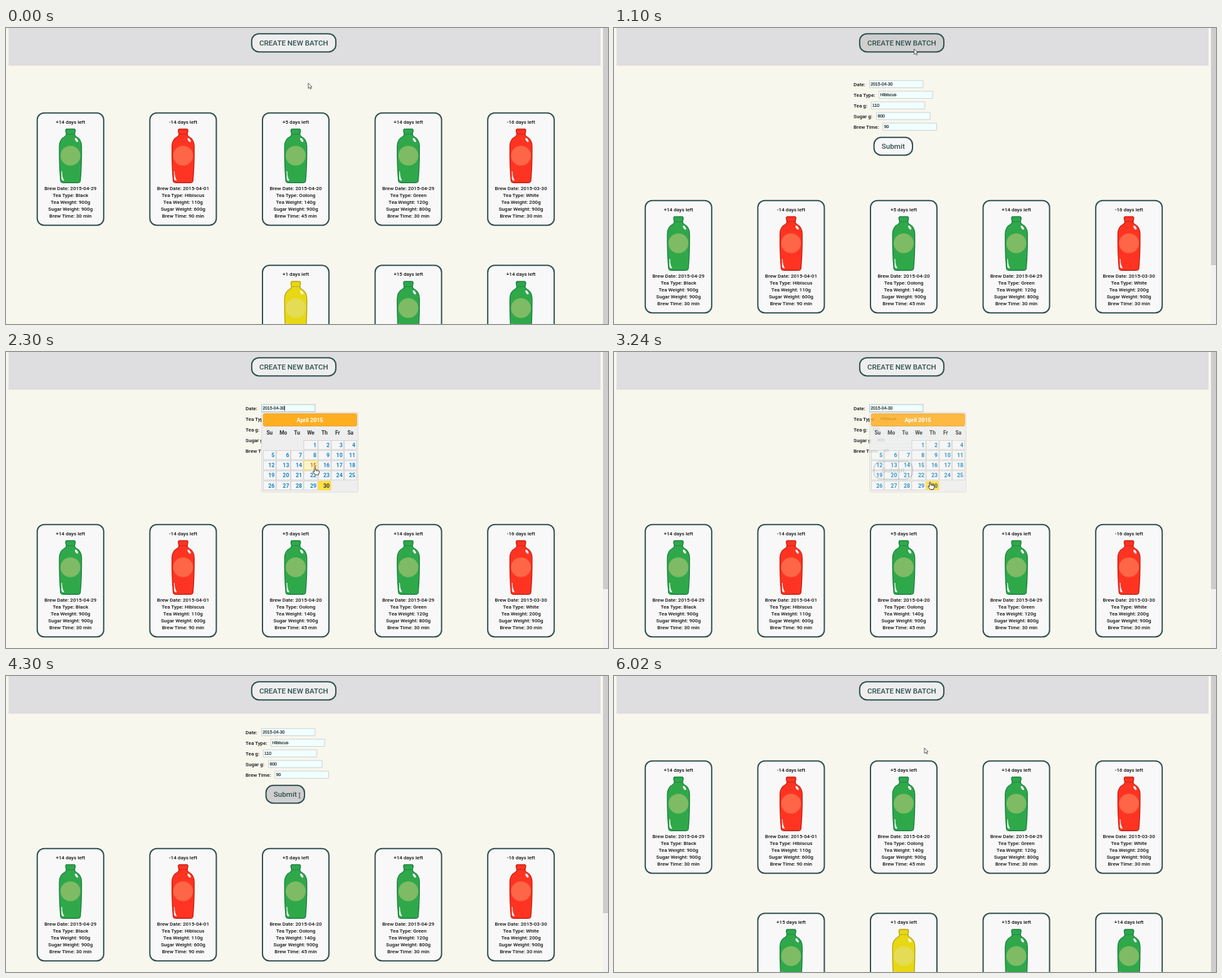
Write an HTML page that moves like this. It is 960 px wide and 473 px high and loops after 6.18 s.

```html
<!DOCTYPE html>
<html lang="en">
<head>
<meta charset="utf-8">
<title>Tea batches</title>
<style>
html, body { margin: 0; width: 100%; height: 100%; overflow: hidden; background: #f8f7ee; }
svg { display: block; width: 100vw; height: 100vh; }
text { font: 500 8.1px Roboto, sans-serif; fill: #111; }
.mid { text-anchor: middle; }
.btn text { font-size: 11.6px; fill: #2f4f4f; text-anchor: middle; }
.btn rect, .card { stroke: #2f4f4f; stroke-width: 2; }
.card { fill: #f8f8f8; }
.input { fill: #f0ffff; stroke: #c6c6c6; stroke-width: .8; }
.value { font: 6.9px "Liberation Sans", Arial, sans-serif; stroke: #111; stroke-width: .15; }
.head { font-size: 9.1px; font-weight: 700; fill: #fff; }
.week { font-size: 8.4px; font-weight: 700; fill: #333; }
.day rect { fill: #f6f6f6; stroke: #ccc; stroke-width: .8; }
.day text { font-size: 8.9px; font-weight: 700; fill: #1c86c4; text-anchor: end; }
.day.over rect { fill: #fdf5ce; stroke: #fbcb09; }
.day.over text { fill: #c77405; }
.day.today rect { fill: #ffe045; stroke: #fed22f; }
.day.today text { fill: #363636; }
</style>
</head>
<body>
<svg id="stage" viewBox="0 0 960 473" preserveAspectRatio="none"></svg>
<script>
const LOOP = 6180, OPEN = 820, CLOSE = 4340, SHIFT = 140;
const stage = document.getElementById('stage');
const $ = id => document.getElementById(id);

const label = (x, y, s, cls = '') => `<text x="${x}" y="${y}" class="${cls}">${s}</text>`;
const box = (x, y, w, h, r, attrs) =>
  `<rect x="${x}" y="${y}" width="${w}" height="${h}" rx="${r}" ${attrs}/>`;

// body, edge, badge
const tints = {
  green: ['#2fa84a', '#1b8044', '#7fbb64'],
  red: ['#ff3322', '#c71f12', '#ff6647'],
  yellow: ['#e8d813', '#b5a311', '#e5dc56']
};

function bottle(tint) {
  const [body, edge, badge] = tints[tint];
  return `<path d="M-6 26.5H6Q8 27 7.6 30L6.6 34.5Q6.5 37 9 38.5Q17.7 43 17.7 54
      Q18 84 15.8 109Q15.4 112.3 11 112.3H-11Q-15.4 112.3 -15.8 109
      Q-18 84 -17.7 54Q-17.7 43 -9 38.5Q-6.5 37 -6.6 34.5L-7.6 30Q-8 27 -6 26.5Z"
      fill="${body}" stroke="${edge}" stroke-width="1.4"/>
    <path d="M-6.5 34.6H6.5" stroke="${edge}" stroke-width=".9"/>
    <circle cy="69" r="15.8" fill="${badge}"/>
    <ellipse cx="9.6" cy="44" rx="1.7" ry="3.6" transform="rotate(-35 9.6 44)" fill="#fff"/>
    <path d="M-14 94Q-13.6 104 -10.5 108.5Q-13.8 109 -14 106Z" fill="#fff" stroke="#fff" stroke-width=".7"/>`;
}

function card(col, row, days, tint, info) {
  const names = ['Brew Date: ', 'Tea Type: ', 'Tea Weight: ', 'Sugar Weight: ', 'Brew Time: '];
  const lines = info ? info.split(',').map((v, i) =>
    label(0, 124.4 + i * 11, names[i] + v, 'mid')).join('') : '';
  return `<g transform="translate(${102.8 + col * 179.6} ${135 + row * 243.5})">
    ${box(-53, .7, 106, 179.6, 11, 'class="card"')}
    ${label(0, 17.6, days + ' days left', 'mid')}${bottle(tint)}${lines}</g>`;
}

const button = (id, x, y, w, h, s) =>
  `<g class="btn">${box(x, y, w, h, 11.5, `id="${id}"`)}${label(x + w / 2, y + 18.6, s)}</g>`;

const fields = [
  ['Date:', 407.4, '2015-04-30'], ['Tea Type:', 422.6, 'Hibiscus'],
  ['Tea g:', 410.3, '110'], ['Sugar g:', 418.6, '600'], ['Brew Time:', 428.9, '90']
];
const form = fields.map(([name, x, v], i) => {
  const y = 84 + i * 17;
  return label(382, y + 8.5, name) + box(x, y, 85.5, 11.5, 0, `class="input" id="input${i}"`) +
    label(x + 1.8, y + 8.3, v, 'value');
}).join('');

const colX = [410.5, 431.2, 454.3, 475, 498, 519, 539.6, 560];
const days = Array.from({ length: 30 }, (_, i) => {
  const col = (i + 3) % 7, row = Math.floor((i + 3) / 7);
  return { n: i + 1, x: colX[col], y: 141.4 + row * 16.2, w: colX[col + 1] - colX[col] - 1, h: 14.4 };
});
const calendar = box(407.5, 96.5, 154, 127.5, 2, 'fill="#eee" stroke="#ddd"') +
  box(410.3, 98.6, 149, 19.8, 2, 'fill="#ffae22" stroke="#eb9a14" stroke-width=".8"') +
  label(484.7, 111.8, 'April 2015', 'mid head') +
  ['Su', 'Mo', 'Tu', 'We', 'Th', 'Fr', 'Sa'].map((s, i) =>
    label((colX[i] + colX[i + 1]) / 2 - .5, 132.2, s, 'mid week')).join('') +
  days.map(d => `<g id="day${d.n}" class="day">${box(d.x, d.y, d.w, d.h, 0, '')}
    ${label(d.x + d.w - 1.8, d.y + 10.4, d.n)}</g>`).join('');

const pointers = {
  arrow: '<path d="M0 0V8.6L2 6.8L3.4 9.7L4.8 9L3.5 6.2H6Z" fill="#fff" stroke="#333" stroke-width=".8"/>',
  beam: '<path d="M-1.6 -4H-.5L0 -3.5L.5 -4H1.6M0 -3.5V3.5M-1.6 4H-.5L0 3.5L.5 4H1.6" fill="none" stroke="#333" stroke-width=".9"/>',
  hand: `<path d="M-1 .8Q0 -.8 1 .8V4.6L2.2 4.2L3.3 4.7L4.4 4.6L5.5 5.3Q6.6 5.2 6.6 6.5V8.8L5.4 12H.4
    L-3 7.8Q-3.4 6.4 -2.2 6.5L-1 7.6Z" fill="#fff" stroke="#222" stroke-width=".9"/>
    <path d="M2.2 4.4V6.6M4.3 4.8V6.8" stroke="#222" stroke-width=".6"/>`
};

stage.innerHTML = `
  <rect width="960" height="473" fill="#f8f7ee"/>
  <rect x="4" width="945" height="61" fill="#fceee5"/>
  <rect x="4" width="944" height="60" fill="#dedddf"/>
  ${button('create', 391.8, 9.2, 134.2, 29, 'CREATE NEW BATCH')}
  <rect x="952" width="8" height="473" fill="#f1f1f1"/>
  <rect id="thumb" x="952" width="8" fill="#cdcdcd"/>
  <g id="cards">
    ${card(0, 0, '+14', 'green', '2015-04-29,Black,900g,900g,30 min')}
    ${card(1, 0, '-14', 'red', '2015-04-01,Hibiscus,110g,600g,90 min')}
    ${card(2, 0, '+5', 'green', '2015-04-20,Oolong,140g,900g,45 min')}
    ${card(3, 0, '+14', 'green', '2015-04-29,Green,120g,800g,30 min')}
    ${card(4, 0, '-16', 'red', '2015-03-30,White,200g,900g,30 min')}
    <g id="added">${card(1, 1, '+15', 'green')}</g>
    ${card(2, 1, '+1', 'yellow')}${card(3, 1, '+15', 'green')}${card(4, 1, '+14', 'green')}
  </g>
  <g id="form">${form}${button('submit', 414.6, 174.8, 61.4, 28.4, 'Submit')}
    <path id="caret" d="M444.4 85.8V94" stroke="#111" stroke-width=".8"/></g>
  <g id="calendar">${calendar}</g>
  <g id="pointer">${Object.keys(pointers).map(k => `<g id="${k}">${pointers[k]}</g>`).join('')}</g>`;

// time, x, y of the pointer
const path = [
  [0, 482, 88], [620, 480, 27], [1000, 480, 27], [1520, 466.5, 93.5], [1780, 466.5, 93.5],
  [2360, 493.5, 187], [2820, 504.5, 208], [3200, 504.5, 208], [3800, 468, 191],
  [4580, 468, 191], [5180, 490, 128], [5780, 495, 115], [LOOP, 495, 115]
];
const clamp = p => Math.max(0, Math.min(1, p));
const ease = p => p * p * (3 - 2 * p);

function pointerAt(t) {
  const i = path.findIndex(k => k[0] > t);
  const [t0, x0, y0] = path[i - 1], [t1, x1, y1] = path[i];
  const p = ease((t - t0) / (t1 - t0));
  return [x0 + (x1 - x0) * p, y0 + (y1 - y0) * p];
}

const inside = (x, y, b) => x >= b.x && x <= b.x + b.w && y >= b.y && y <= b.y + b.h;
const show = (id, on) => $(id).setAttribute('display', on ? 'inline' : 'none');

function draw(t) {
  const open = t >= OPEN && t < CLOSE;
  const [x, y] = pointerAt(t);
  const fade = ease(clamp((t - 1790) / 200)) * (1 - ease(clamp((t - 3190) / 200)));
  const picking = fade > 0;
  const onCreate = inside(x, y, { x: 392, y: 9, w: 134, h: 29 });
  const onSubmit = open && !picking && inside(x, y, { x: 414, y: 174, w: 62, h: 29 });
  const onDate = open && !picking && inside(x, y, { x: 407, y: 84, w: 86, h: 12 });

  show('form', open);
  show('added', t >= CLOSE);
  $('cards').setAttribute('transform', `translate(0 ${open ? SHIFT : 0})`);
  $('thumb').setAttribute('height', open ? 379 : 473);
  $('create').setAttribute('fill', onCreate ? '#cfcfcf' : '#eee');
  $('submit').setAttribute('fill', onSubmit ? '#cfcfcf' : '#f7f7f7');
  $('input0').style.stroke = t >= 1760 && t < 3800 ? '#9fb4b8' : '';
  show('caret', t >= 1760 && t < 2390);

  show('calendar', picking);
  $('calendar').setAttribute('opacity', fade);
  let hit = 0;
  for (const d of days) {
    const over = picking && inside(x, y, d);
    if (over) hit = d.n;
    $('day' + d.n).setAttribute('class', 'day' + (d.n === 30 ? ' today' : over ? ' over' : ''));
  }

  const kind = hit ? 'hand' : onSubmit || onDate ? 'beam' : 'arrow';
  for (const k in pointers) show(k, k === kind);
  $('pointer').setAttribute('transform', `translate(${x} ${y})`);
}

const start = performance.now();
function tick() {
  draw((performance.now() - start) % LOOP);
  requestAnimationFrame(tick);
}
tick();
</script>
</body>
</html>
```
